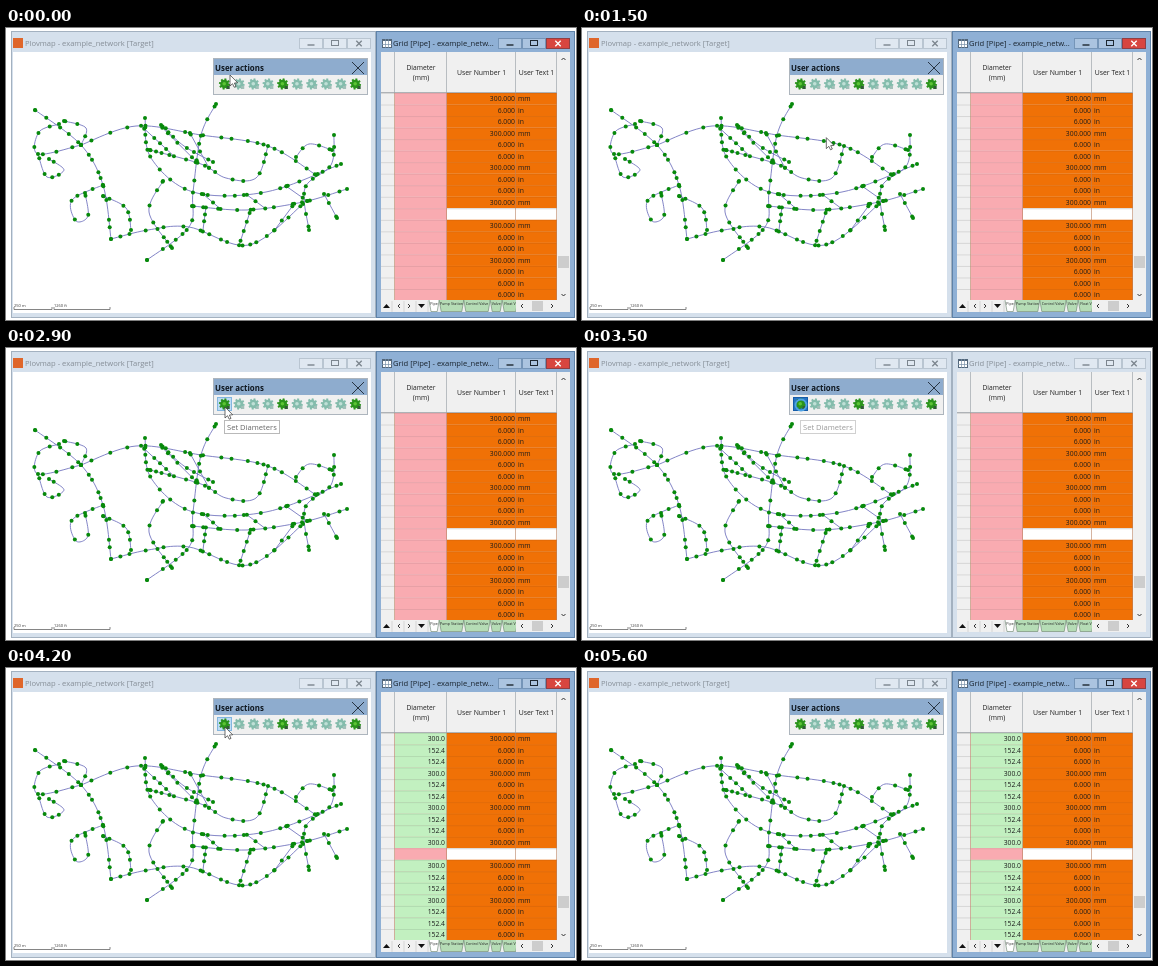
Recreate the animation shown at these times as an HTML page with a canvas. Size 570 px wide and 292 px high, loop 5800 ms.

```html
<!DOCTYPE html>
<html lang="en">
<head>
<meta charset="utf-8">
<title>Set diameters</title>
<style>
html, body { margin: 0; width: 100%; height: 100%; overflow: hidden; background: #fff; }
canvas { display: block; width: 570px; height: 292px; }
</style>
</head>
<body>
<canvas id="stage"></canvas>
<script>
const W = 570, H = 292, LOOP = 5800, STEP = 100;
const canvas = document.getElementById('stage');
const ctx = canvas.getContext('2d');
const dpr = window.devicePixelRatio || 1;
canvas.width = W * dpr;
canvas.height = H * dpr;

const FONT = '"Open Sans", "Noto Sans", sans-serif';
const ORANGE = '#f07106', PINK = '#f9abb1', GREEN = '#c2f0c0', FACE = '#f0f0f0';
const ROW_TOP = 65, ROW_H = 11.53, ROWS = 18, BLANK_ROW = 10, GRID_BOTTOM = 272;
const NODE_GAP = 13;

// Main roads through a few key points; side streets link them by fractions.
const spine = {
  north: [75,117, 130,98, 195,107, 262,118, 310,147],
  centre: [139,90, 145,130, 187,164, 260,164, 335,136],
  lower: [186,178, 240,182, 297,174, 341,161],
  south: [105,211, 142,202, 183,199, 243,217, 297,176],
  west: [29,82, 75,117, 97,157, 105,211],
  cross: [210,76, 195,107, 187,164, 183,199, 141,232],
  inner: [144,122, 195,136, 220,150, 250,150, 262,118]
};
const loops = [
  [53,96, 33,104, 32,126, 75,117],
  [32,126, 41,149, 58,142, 43,131],
  [58,93, 80,100, 75,117],
  [97,157, 66,172, 70,193, 82,188, 79,165],
  [97,168, 120,180, 125,202],
  [157,153, 143,184, 166,220],
  [155,97, 178,118, 207,134],
  [328,107, 325,137, 299,160, 303,202],
  [290,129, 303,116, 326,122],
  [318,166, 331,190]
];

const clamp = v => Math.max(0, Math.min(1, v));
const ramp = (t, a, b) => clamp((t - a) / (b - a));
const ease = v => v * v * (3 - 2 * v);

function seeded(seed) {
  return () => (seed = seed * 16807 % 2147483647) / 2147483647;
}

// Catmull-Rom curve through the key points, as [x, y] samples.
function smooth(keys, detail = 12) {
  const count = keys.length / 2, samples = [];
  const key = (i, axis) => keys[2 * Math.max(0, Math.min(count - 1, i)) + axis];
  const blend = (i, u, axis) => {
    const [a, b, c, d] = [-1, 0, 1, 2].map(k => key(i + k, axis));
    return b + .5 * u * (c - a + u * (2 * a - 5 * b + 4 * c - d + u * (3 * (b - c) + d - a)));
  };
  for (let n = 0; n <= (count - 1) * detail; n++) {
    const i = Math.floor(n / detail), u = n / detail - i;
    samples.push([blend(i, u, 0), blend(i, u, 1)]);
  }
  return samples;
}

const at = (road, f) => road[Math.round(f * (road.length - 1))];

function buildRoads() {
  const main = {};
  for (const name in spine) main[name] = smooth(spine[name]);
  const streets = [];
  for (let k = 0; k < 3; k++) {
    streets.push([at(main.centre, .55 + k * .13), at(main.lower, .2 + k * .25)]);
    streets.push([at(main.lower, .12 + k * .25), at(main.south, .56 + k * .15)]);
    streets.push([at(main.north, .27 + k * .09), at(main.inner, .12 + k * .1)]);
  }
  return [...Object.values(main), ...loops.map(keys => smooth(keys)), ...streets];
}

function placeNodes(roads) {
  const random = seeded(41), nodes = [];
  for (const road of roads) {
    nodes.push(road[0], road[road.length - 1]);
    let left = NODE_GAP * random();
    for (let i = 1; i < road.length; i++) {
      const [x0, y0] = road[i - 1], [x1, y1] = road[i];
      const length = Math.hypot(x1 - x0, y1 - y0);
      let done = left;
      while (done < length) {
        const u = done / length;
        nodes.push([x0 + (x1 - x0) * u, y0 + (y1 - y0) * u]);
        done += NODE_GAP * (.4 + 1.2 * random());
      }
      left = done - length;
    }
  }
  return nodes;
}

const roads = buildRoads();
const nodes = placeNodes(roads);

function rect(x, y, w, h, fill, stroke) {
  if (fill) { ctx.fillStyle = fill; ctx.fillRect(x, y, w, h); }
  if (stroke) {
    ctx.strokeStyle = stroke;
    ctx.lineWidth = 1;
    ctx.strokeRect(x + .5, y + .5, w - 1, h - 1);
  }
}

function trace(points) {
  ctx.beginPath();
  for (let i = 0; i < points.length; i += 2) ctx.lineTo(points[i], points[i + 1]);
}

function line(points, color, width = 1) {
  trace(points);
  ctx.strokeStyle = color;
  ctx.lineWidth = width;
  ctx.stroke();
}

function shape(points, fill) {
  trace(points);
  ctx.closePath();
  ctx.fillStyle = fill;
  ctx.fill();
}

function disc(x, y, r, fill) {
  ctx.beginPath();
  ctx.arc(x, y, r, 0, Math.PI * 2);
  ctx.fillStyle = fill;
  ctx.fill();
}

function text(s, x, y, size = 6.8, color = '#1c1c1c', align = 'left', weight = 400) {
  ctx.font = `${weight} ${size}px ${FONT}`;
  ctx.textAlign = align;
  ctx.textBaseline = 'alphabetic';
  ctx.fillStyle = color;
  ctx.fillText(s, x, y + size * .36);
}

function cross(x, y, r, color, width = 1) {
  line([x - r, y - r, x + r, y + r], color, width);
  line([x + r, y - r, x - r, y + r], color, width);
}

function chevron(x, y, dx, dy) {
  line([x - dx - dy * 2, y - dy - dx * 2, x + dx, y + dy, x - dx + dy * 2, y - dy + dx * 2], '#333');
}

function captionButtons(x, active) {
  const ink = active ? '#1d2730' : '#7c858e';
  const edge = active ? '#7595b8' : '#b9c5d1';
  for (let i = 0; i < 3; i++) {
    const close = active && i === 2;
    rect(x - 12 + i * 24, 10, 24, 11, close ? '#d8453f' : 'rgba(255,255,255,.25)', close ? '#8f3f45' : edge);
  }
  line([x - 3.5, 17, x + 3.5, 17], ink, 1.4);
  rect(x + 20, 12, 8, 6, null, ink);
  cross(x + 48, 15.5, 2.7, active ? '#fff' : ink, 1.3);
}

function frame(x, w, active) {
  rect(x, 3, w, 287, active ? '#8fb0d5' : '#d5e0ec', active ? '#5f83a9' : '#a3b1c0');
}

function drawNetwork() {
  ctx.lineJoin = 'round';
  for (const road of roads) line(road.flat(), '#7476c0', .9);
  ctx.lineJoin = 'miter';
  for (const [x, y] of nodes) disc(x, y, 2, '#07890b');
}

function scaleBar(x, width, label) {
  text(label, x, 278, 4, '#333');
  line([x, 279, x, 281.5, x + width, 281.5, x + width, 279], '#666', .8);
}

function drawMap() {
  frame(5, 365, false);
  rect(7, 10, 10, 10, '#df662b');
  text('Plovmap - example_network [Target]', 19, 15.5, 7.6, '#858d96');
  captionButtons(305, false);
  rect(7, 24, 358, 261, '#fff');
  drawNetwork();
  scaleBar(8, 38, '250 m');
  scaleBar(48, 56, '1260 ft');
}

function gear(x, y, bright) {
  const color = bright ? '#2b931c' : '#84bcac';
  for (let i = 0; i < 8; i++) {
    const a = i * Math.PI / 4 + .2;
    line([x, y, x + Math.cos(a) * 5.6, y + Math.sin(a) * 5.6], color, 2);
  }
  disc(x, y, 4.3, color);
  disc(x - .3, y - .3, 1.8, bright ? '#5cc435' : '#bfe0d6');
  rect(x + 2.2, y + 2, 3, 3, bright ? '#315c37' : '#a2bfb8');
}

function drawToolbar(hover, pressed) {
  rect(207, 30, 155, 37, FACE, '#adb5bd');
  rect(208, 31, 153, 16, '#8eacce');
  text('User actions', 209, 39.7, 7.9, '#101820', 'left', 700);
  cross(352, 40, 6, '#273443');
  if (hover) rect(211, 49, 15, 14, pressed ? '#2874c4' : '#bddcf5', pressed ? '#155ca8' : '#82b5df');
  for (let i = 0; i < 10; i++) gear(218.5 + i * 14.55, 56, i === 9 || i % 4 === 0 && i < 8);
}

function drawRow(i, filled) {
  const y = ROW_TOP + i * ROW_H, mid = y + ROW_H / 2;
  const blank = i === BLANK_ROW, done = filled && !blank;
  const position = i < BLANK_ROW ? i : i - BLANK_ROW - 1;
  const metric = position % 3 === 0 && i < ROWS - 1;
  rect(375, y, 14, ROW_H, FACE);
  rect(389, y, 52, ROW_H, done ? GREEN : PINK);
  rect(441, y, 110, ROW_H, blank ? '#fff' : ORANGE);
  line([375, y + .5, 389, y + .5], '#ccc', .7);
  line([389, y + .5, 441, y + .5], done ? '#a7cfa6' : '#db999f', .6);
  line([441, y + .5, 551, y + .5], blank ? '#b9bfc5' : '#d7670b', .6);
  if (blank) return;
  if (done) text(metric ? '300.0' : '152.4', 439, mid, 6.8, '#1c1c1c', 'right');
  text(metric ? '300.000' : '6.000', 509, mid, 6.8, '#1c1c1c', 'right');
  text(metric ? 'mm' : 'in', 512, mid);
}

function drawRows(filled) {
  for (let i = 0; i < ROWS; i++) drawRow(i, filled);
}

function drawTabs() {
  rect(375, GRID_BOTTOM, 189, 12, FACE);
  shape([377, 280, 380.5, 276, 384, 280], '#111');
  shape([412, 276, 419, 276, 415.5, 280], '#111');
  chevron(393, 278, -1, 0);
  chevron(403, 278, 1, 0);
  for (let i = 0; i < 4; i++) line([386 + i * 12, 273, 386 + i * 12, 284], '#c9c9c9', .7);
  let x = 423;
  for (const name of ['Pipe', 'Pump Station', 'Control Valve', 'Valve', 'Float V']) {
    const w = 3 + name.length * 1.8;
    shape([x, 272, x + w, 272, x + w - 2, 283.5, x + 2, 283.5], name === 'Pipe' ? '#fff' : '#b5dcb5');
    line([x, 272, x + 2, 283.5, x + w - 2, 283.5, x + w, 272], '#66806a', .6);
    text(name, x + w / 2, 275.5, 3.7, '#222', 'center');
    x += w;
  }
  rect(510, GRID_BOTTOM, 54, 12, FACE);
  chevron(516, 278, -1, 0);
  rect(526, 273, 11, 10, '#cdcdcd');
  chevron(546, 278, 1, 0);
}

function drawGridIcon() {
  rect(376, 11, 10, 9, '#fff', '#52667a');
  rect(376, 11, 10, 2, '#52667a');
  line([379.5, 11, 379.5, 20], '#7890a8', .7);
  line([382.5, 11, 382.5, 20], '#7890a8', .7);
  line([376, 16.5, 386, 16.5], '#7890a8', .7);
}

function drawGrid(active, filledTo) {
  frame(370, 199, active);
  drawGridIcon();
  text('Grid [Pipe] - example_netw...', 387, 15.5, 7.6, active ? '#18222c' : '#858d96');
  captionButtons(504, active);
  rect(375, 24, 189, 260, FACE);
  text('Diameter', 415, 39.5, 6.7, '#222', 'center');
  text('(mm)', 415, 49.5, 6.7, '#222', 'center');
  text('User Number 1', 475.5, 44.5, 6.9, '#222', 'center');
  text('User Text 1', 530.5, 44.5, 6.9, '#222', 'center');
  drawRows(false);
  ctx.save();
  ctx.beginPath();
  ctx.rect(375, ROW_TOP, 176, filledTo - ROW_TOP);
  ctx.clip();
  drawRows(true);
  ctx.restore();
  for (const x of [389, 441, 510, 551]) {
    line([x - .5, 24, x - .5, 65], '#aab0b5', .8);
    line([x - .5, 65, x - .5, GRID_BOTTOM], '#b98262', .6);
  }
  line([375, 64.5, 551, 64.5], '#9da3a8', .8);
  rect(551, 24, 13, 248, FACE);
  rect(552, 228, 11, 12, '#cdcdcd');
  chevron(557.5, 31, 0, -1);
  chevron(557.5, 267, 0, 1);
  drawTabs();
}

function withAlpha(alpha, draw) {
  if (alpha <= 0) return;
  ctx.save();
  ctx.globalAlpha = alpha;
  draw();
  ctx.restore();
}

function drawTooltip() {
  rect(218, 72, 56, 14, '#fff', '#b9b9b9');
  text('Set Diameters', 221, 79, 7.6, '#666');
}

function drawDialog() {
  ctx.shadowColor = 'rgba(0,0,0,.35)';
  ctx.shadowBlur = 5;
  rect(229, 9, 205, 131, FACE);
  ctx.shadowColor = 'transparent';
  rect(229, 9, 205, 131, null, '#8d969d');
  rect(230, 10, 203, 18, '#fff');
  text('Please wait...', 235, 18.5, 7.5, '#000');
  cross(422, 18.5, 2.8, '#222');
  text('Starting...', 245, 44, 7.5, '#000');
  text('0 %', 331, 66.5, 7.5, '#000', 'center');
  rect(247, 74, 168, 18, '#e6e6e6', '#bcbcbc');
  rect(304, 112, 54, 19, '#e1e1e1', '#2f72b4');
  text('Cancel', 331, 121.5, 7.5, '#000', 'center');
}

function drawArrow(x, y) {
  const arrow = [0, 0, 0, 11, 2.5, 8.7, 4.2, 12.2, 6, 11.4, 4.4, 8, 7.7, 7.8];
  ctx.save();
  ctx.translate(x, y);
  shape(arrow, '#fff');
  line([...arrow, 0, 0], '#333', .7);
  ctx.restore();
}

function drawBusyRing(x, y) {
  ctx.beginPath();
  ctx.arc(x, y, 5.5, 0, Math.PI * 2);
  ctx.strokeStyle = '#4fa3e6';
  ctx.lineWidth = 1.8;
  ctx.stroke();
}

function cursorAt(t) {
  if (t < 100) return [224, 47];
  if (t < 1400 || t >= 5400) return null;
  const inward = ease(ramp(t, 1400, 1800));
  const outward = ease(ramp(t, 5000, 5400));
  return [
    219 + 30 * (1 - inward) + 298 * outward,
    59 + 60 * (1 - inward) + 230 * outward
  ];
}

function drawCursor(t) {
  const cursor = cursorAt(t);
  if (!cursor) return;
  if (t >= 3400 && t < 3700) drawBusyRing(219, 57);
  else drawArrow(...cursor);
}

function render(t) {
  ctx.setTransform(dpr, 0, 0, dpr, 0, 0);
  rect(0, 0, W, H, '#fff');
  const pressed = t >= 3300 && t < 3900;
  drawMap();
  drawGrid(!pressed, t < 3700 ? ROW_TOP : t < 3800 ? 153 : GRID_BOTTOM);
  drawToolbar(t >= 1700 && t < 5100, pressed);
  withAlpha(ramp(t, 2400, 2700) * (1 - ramp(t, 3300, 3900)), drawTooltip);
  withAlpha(t < 3600 || t >= 3800 ? 0 : t < 3700 ? .95 : .87, drawDialog);
  drawCursor(t);
}

const start = performance.now();
function tick() {
  const t = (performance.now() - start) % LOOP;
  render(Math.floor(t / STEP) * STEP);
  requestAnimationFrame(tick);
}
tick();
</script>
</body>
</html>
```
